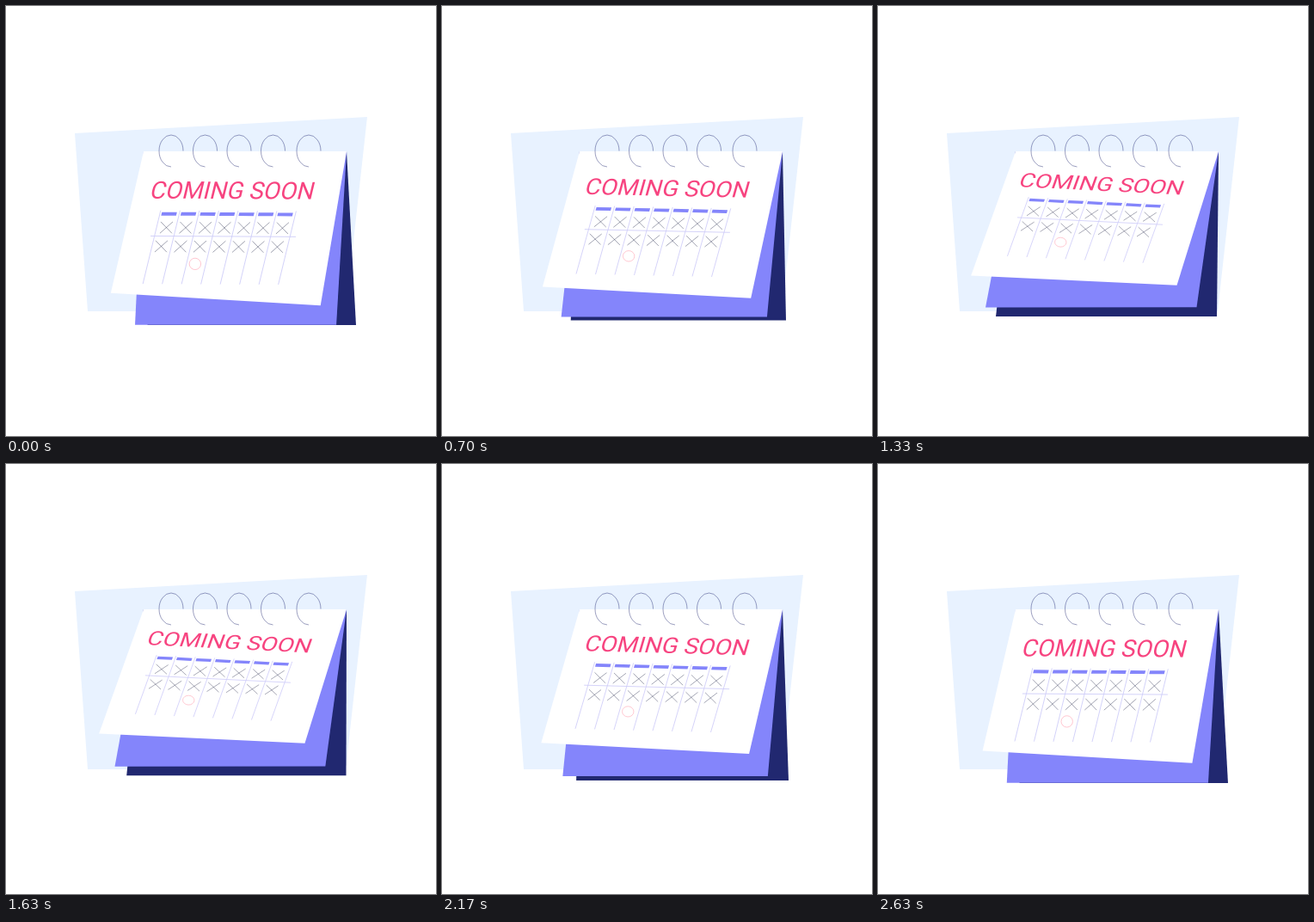
Animation of 500 by 500 pixels, one loop 2670 ms. Source, as an HTML page:

```html
<!DOCTYPE html>
<html lang="en">
<head>
<meta charset="utf-8">
<title>Coming soon</title>
<style>
  html, body { margin: 0; width: 100%; height: 100%; overflow: hidden; background: #fff; }
  svg { display: block; width: 100%; height: 100%; }
  text { font: 28px Roboto, sans-serif; fill: #f74480; }
  path { fill: none; }
</style>
</head>
<body>
<svg viewBox="0 0 500 500">
  <polygon points="80,148 420,129 395,355 95,355" fill="#e8f2ff"/>
  <polygon id="back" fill="#212870"/>
  <polygon id="middle" fill="#8485fb"/>
  <polygon id="front" fill="#fff"/>
  <g id="content">
    <text x="19.5" y="55">COMING SOON</text>
    <path id="grid" stroke="#cfcdf9" stroke-width=".85"/>
    <path id="bars" stroke="#8485fb" stroke-width="4"/>
    <path id="crosses" stroke="#2c3050" stroke-width=".42"/>
    <circle r="6.7" transform="translate(91.6 131.3) skewX(13.5)" fill="none" stroke="#ffb8c4" stroke-width=".8"/>
  </g>
  <path id="rings" stroke="#212870" stroke-width=".45"/>
</svg>
<script>
const LOOP = 2670, COLUMN = 22.5;
const el = id => document.getElementById(id);
const columns = (count, draw) => Array.from({ length: count }, (_, i) => draw(i * COLUMN)).join('');

const cross = (x, y) => `M${x - 8.1} ${y - 6.7}l16.2 13.4m-2.2-13.4l-11.8 13.4`;
el('grid').setAttribute('d', columns(8, x => `M${36.6 + x} 69v86`) + 'M32 99H201');
el('bars').setAttribute('d', columns(7, x => `M${38.5 + x} 73h17.5`));
el('crosses').setAttribute('d', columns(7, x => cross(48 + x, 89) + cross(47.3 + x, 111)));
el('rings').setAttribute('d', [192, 231.5, 271, 310.5, 352]
  .map(x => `M${x + 14} 168.5A14 18.5 0 1 0 ${x} 187`).join(''));

// Smooth lift from 0 to 1 and back, once per loop
const lift = (time, delay) => (1 - Math.cos((time - delay) / LOOP * 2 * Math.PI)) / 2;

// Each page hangs from the rings; its lower corners move in proportion to the lift
function swing(id, p, left, right) {
  const corner = ([x, y, dx, dy]) => `${x - dx * p},${y - dy * p}`;
  el(id).setAttribute('points', `160,169 396,169 ${corner(right)} ${corner(left)}`);
}

function draw(now) {
  const time = now % LOOP;
  const p = lift(time, 148);
  swing('back', lift(time, 0), [164.6, 371, 27.6, 10], [407, 371, 13, 10]);
  swing('middle', lift(time, 72), [150.2, 371, 25.4, 20.7], [384.2, 371, 13.8, 20.9]);
  swing('front', p, [122.3, 334.5, 14.6, 21.6], [366.3, 349, 19.4, 25]);
  el('content').setAttribute('transform',
    `matrix(1 ${.004 + .047 * p} ${-.24 - .05 * p} ${1 - .206 * p} ${160 - 1.5 * p} ${169 - 4.1 * p})`);
  requestAnimationFrame(() => draw(performance.now()));
}
draw(performance.now());
</script>
</body>
</html>
```
